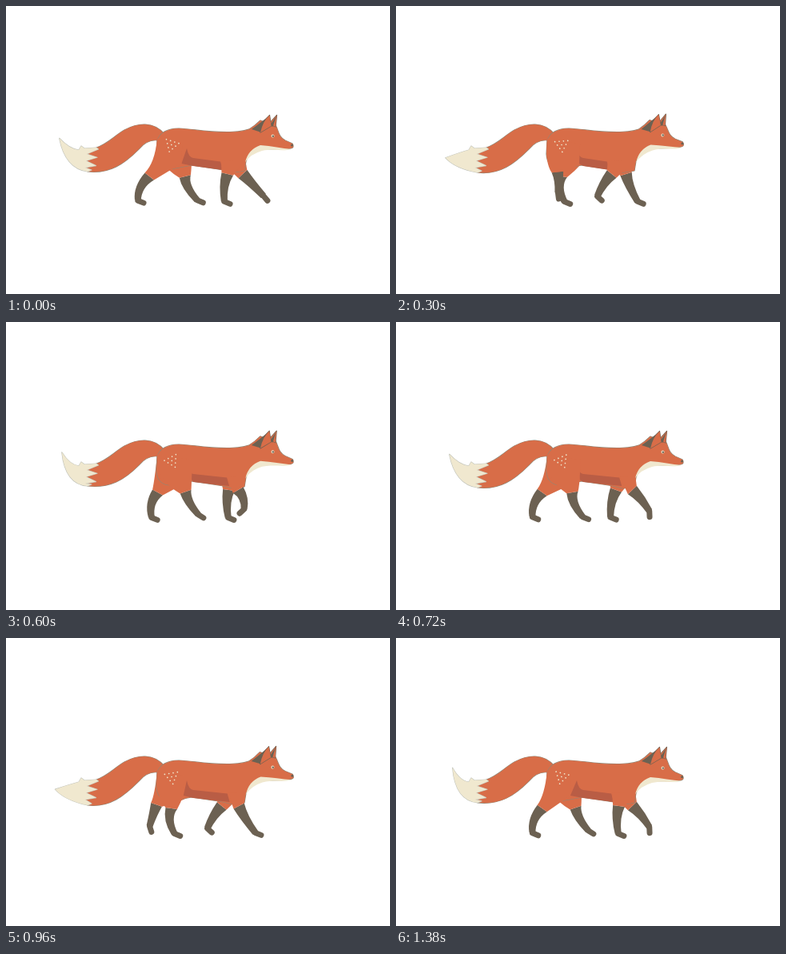
Recreate the animation shown at these times as an HTML page with a canvas. Size 480 px wide and 360 px high, loop 1440 ms.

```html
<!DOCTYPE html>
<html lang="en">
<head>
<meta charset="utf-8">
<title>Walking fox</title>
<style>
html, body { margin: 0; width: 100%; height: 100%; overflow: hidden; background: #fff; }
canvas { display: block; width: 480px; height: 360px; }
</style>
</head>
<body>
<canvas id="stage" width="480" height="360"></canvas>
<script>
const ctx = document.getElementById('stage').getContext('2d');
const LOOP = 1440, STEP = 60, LAG = 660;
const ORANGE = '#d86d48', SHADE = '#b95d45', DARK = '#6c6152', CREAM = '#f0e8cf', EDGE = '#8c8878';

// A foot swings forward during `swing` ms from `lift`, then slides back evenly.
// The knee follows the ankle by `follow`; `bend` bows the shin, `curl` turns the paw.
const HIND = {
  lift: 40, swing: 600, back: 161, front: 241, haste: 0.8, rise: 2,
  kneeX: 201, kneeY: 213, follow: 0.6, push: 0, tuck: 0.5, bend: -4, curl: 1, half: 7.3
};
const FORE = {
  lift: 930, swing: 550, back: 251, front: 323, haste: 1, rise: 5,
  kneeX: 282, kneeY: 210, follow: 0.37, push: 0.4, tuck: 0, bend: -2, curl: 2, half: 7.5
};

const wave = (t, period, peak = 0) => Math.cos((t - peak) / period * 2 * Math.PI);

function pose(g, time) {
  const t = (time - g.lift + LOOP) % LOOP;
  const swinging = t < g.swing;
  const p = swinging ? t / g.swing : (LOOP - t) / (LOOP - g.swing);
  const e = swinging ? p ** g.haste : p;
  const travel = swinging ? e * e * (3 - 2 * e) : e;
  const hop = swinging ? 11 * Math.sin(Math.PI * e) : 0;
  const centre = (g.front + g.back) / 2;
  const ax = g.back + (g.front - g.back) * travel;
  const ay = 244.5 - hop - g.rise * (2 * travel - 1) ** 4;
  const x = g.kneeX + g.follow * (ax - centre) + g.push * hop;
  const y = g.kneeY - g.tuck * hop;
  const paw = 0.45 + g.curl * hop / 11;
  return {
    x, y, ax, ay, half: g.half,
    mx: (x + ax) / 2 + g.bend + hop * 0.45, my: (y + ay) / 2 - 1,
    tx: ax + 8 * Math.cos(paw), ty: ay + 8 * Math.sin(paw) - 0.5
  };
}

function shape(d, fill, edge) {
  const path = new Path2D(d);
  if (edge) {
    ctx.strokeStyle = edge;
    ctx.lineWidth = 1.2;
    ctx.stroke(path);
  }
  ctx.fillStyle = fill;
  ctx.fill(path);
}

function dot(x, y, r, fill) {
  ctx.fillStyle = fill;
  ctx.beginPath();
  ctx.arc(x, y, r, 0, 2 * Math.PI);
  ctx.fill();
}

// Left and right sock corners, square to the shin
function cuff({ x, y, mx, my, half }) {
  const len = Math.hypot(mx - x, my - y);
  const nx = (my - y) / len * half, ny = (mx - x) / len * half;
  return [[x - nx, y + ny], [x + nx, y - ny]];
}

function sock(leg) {
  const { x, y, mx, my, ax, ay, tx, ty } = leg;
  const [l, r] = cuff(leg);
  const len = Math.hypot(ax - mx, ay - my);
  const nx = (ay - my) / len, ny = -(ax - mx) / len;
  const cx = 2 * mx - (x + ax) / 2, cy = 2 * my - (y + ay) / 2;
  const at = (px, py, w) => `${px + nx * w} ${py + ny * w}`;
  shape(`M${l} Q${at(cx, cy, -5)} ${at(ax, ay, -4)} L${at(ax, ay, 4)} Q${at(cx, cy, 5)} ${r}Z`, DARK);
  ctx.strokeStyle = DARK;
  ctx.lineWidth = 7;
  ctx.beginPath();
  ctx.moveTo(ax, ay);
  ctx.lineTo(tx, ty);
  ctx.stroke();
}

function hindLeg(leg, front) {
  const [l, r] = cuff(leg);
  sock(leg);
  shape(`M189 166 Q186 196 ${l} L${r} Q${(r[0] + front) / 2} 207 ${front} 197 L${front + 1} 172Z`, ORANGE);
}

function foreLeg(leg, back) {
  const [l, r] = cuff(leg);
  sock(leg);
  shape(`M${back} 194 L${l} L${r} L299 192Z`, ORANGE);
}

function tail(t) {
  const tipY = 176 - 14 * wave(t, 720, 640);
  const tip = [58 + (tipY - 180) ** 2 / 25, tipY];
  const low = 207 + 2.3 * wave(t, 720, 180);
  let teeth = '';
  for (let i = 0; i < 3; i++)
    teeth += `L${115.5 - 1.5 * i} ${179 + 10.3 * i} L${101 - i} ${185 + 8.5 * i} `;
  teeth += `L107 ${low - 2} L102 ${low}`;
  shape(`M198 160 C184 144 165 146 148 155 C136 162 126 173 113 177 ${teeth}
    C130 ${low + 3} 148 197 166 179 Q177 166 190 168Z`, ORANGE, EDGE);
  shape(`M${tip} Q80 ${181 + (tipY - 176) * 0.15} 91 180 L94 175 L98 178 L113 177 ${teeth}
    Q74 203 ${tip}Z`, CREAM, '#c3c5bb');
}

function torso(nod) {
  const path = new Path2D(`M189 168 C192 160 200 153 216 153 C236 154 250 158 280 157.5
    C298 157 306 154 312 150 L322 165 L316 179 Q303 184 300 194 L298 206 L284 208 L272 205
    L232 199 L205 204 Q189 203 188 185Z`);
  path.addPath(new Path2D(`M304 154 Q311 150 318 143 L331 148 L337 149 C341 156 340 163 349 168
    L358 172 Q361 177 356 178 C346 180 330 178 318 179 Q309 181 304 187Z`), nod);
  shape(path, ORANGE, EDGE);
}

function face() {
  shape('M329 147 L338.5 136.5 L337 151Z', ORANGE, DARK);
  shape('M330 149 L338 137.5 L333.5 151Z', DARK);
  shape('M307 154 Q317 147 329 137 L319 158Z', DARK);
  shape('M318 158 Q321 144 329.5 136.5 L331.5 150Z', ORANGE, DARK);
  shape('M357 179 C345 178 332 175 318 174 Q303 179 299 195 Q306 185 320 181 C335 178 345 182 357 179Z', CREAM);
  dot(333.5, 162.5, 2, CREAM);
  dot(333.8, 162.7, 1.2, DARK);
  dot(357.5, 174, 1.5, DARK);
}

function spots(kneeX) {
  ctx.save();
  ctx.translate(207, 173);
  ctx.rotate((197 - kneeX) * Math.PI / 180);
  for (let row = 0; row < 4; row++)
    for (let i = 0; i < 4 - row; i++)
      dot((i - (3 - row) / 2) * 5.4, row * 4.5 - 4, 0.85, CREAM);
  ctx.restore();
}

function draw(t) {
  ctx.fillStyle = '#fff';
  ctx.fillRect(0, 0, 480, 360);
  ctx.lineCap = ctx.lineJoin = 'round';
  const hind = pose(HIND, t), fore = pose(FORE, t + LAG);
  const left = 224.5 + 8 * wave(t, LOOP, 520);
  const right = 273 + 0.6 * (fore.x - 280);
  const nod = new DOMMatrix().translate(306, 165).rotate(1.25 * (wave(t, 720) - 1)).translate(-306, -165);

  tail(t);
  hindLeg(pose(HIND, t + LAG), 232);
  foreLeg(pose(FORE, t), 268);
  torso(nod);
  shape(`M${left} 197 L226 178 Q228 189 234 190 L${right - 3} 194.5 L${right} 205 L234 200Z`, SHADE);
  hindLeg(hind, left);
  foreLeg(fore, right - 2);
  spots(hind.x);

  ctx.save();
  ctx.transform(nod.a, nod.b, nod.c, nod.d, nod.e, nod.f);
  face();
  ctx.restore();
}

function tick() {
  draw(Math.floor(performance.now() % LOOP / STEP) * STEP);
  requestAnimationFrame(tick);
}
tick();
</script>
</body>
</html>
```
